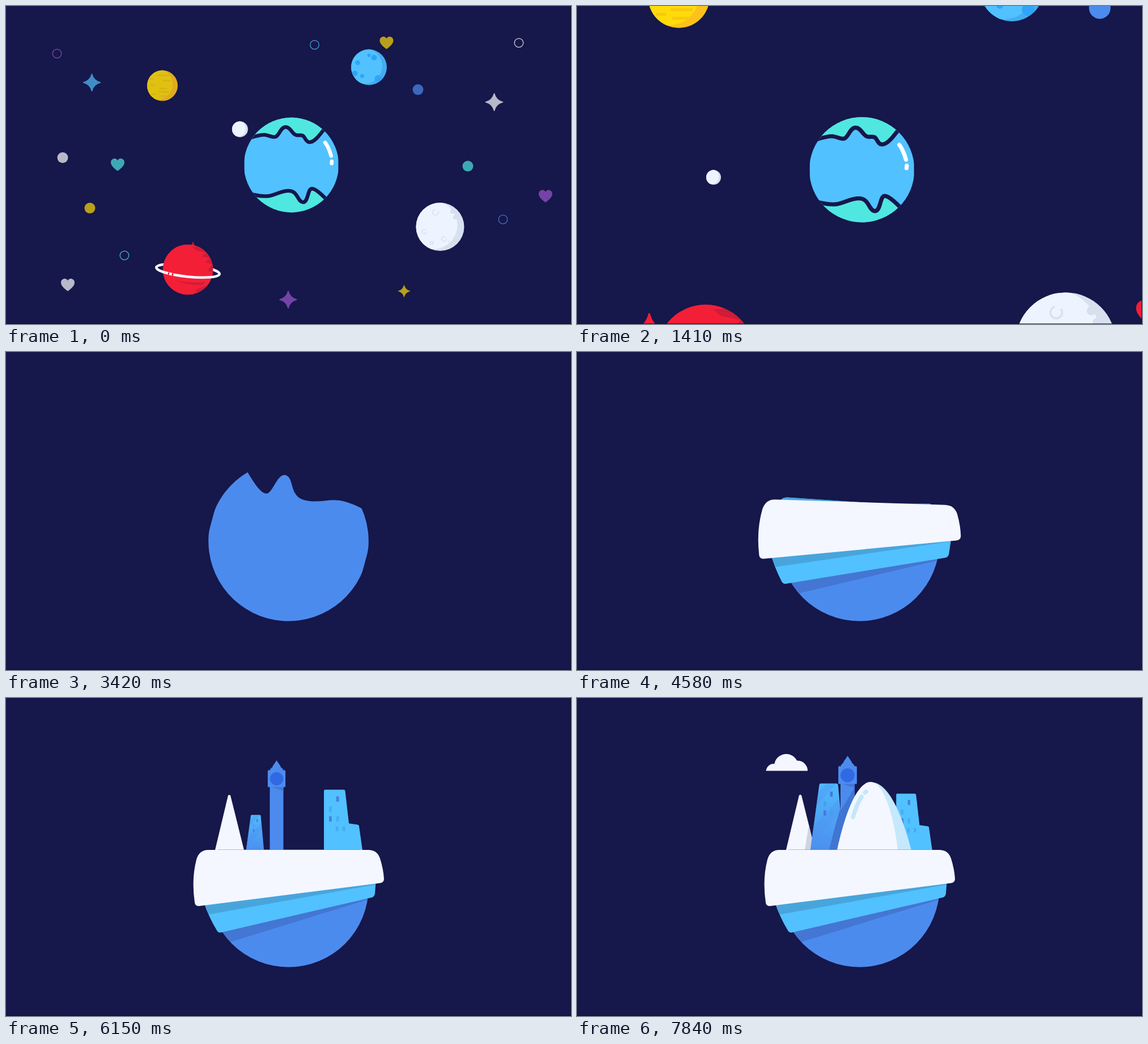
Write an HTML page that moves like this. It is 997x561 px and loops after 7990 ms.

```html
<!DOCTYPE html>
<html lang="en">
<head>
<meta charset="utf-8">
<title>Planet city</title>
<style>
html, body { margin: 0; height: 100%; overflow: hidden; background: #16174a; }
svg { display: block; width: 100vw; height: 100vh; }
</style>
</head>
<body>
<svg viewBox="0 0 997 561">
  <defs>
    <clipPath id="disc"><circle r="141.3"/></clipPath>
    <clipPath id="baseClip"><circle cx="498.5" cy="333.5" r="141"/></clipPath>
    <path id="bandShape" d="M373 268H630Q648 268 651 290L652.5 325 651 345Q650 351 645 352L380 413.5Q375 415 372 410Q358 387 349 360L357 284Q360 268 373 268Z"/>
    <clipPath id="bandClip"><use href="#bandShape"/></clipPath>
    <path id="towerTwo" d="M412 268L427.5 155Q428 152 430 152H457Q460 152 460.5 155L471 268Z"/>
    <clipPath id="twoClip"><use href="#towerTwo"/></clipPath>
    <linearGradient id="glass" x2="0" y2="1">
      <stop stop-color="#50bafd"/><stop offset="1" stop-color="#4c8fee"/>
    </linearGradient>
  </defs>

  <g id="space"><g id="decor"></g><g id="planets"></g></g>

  <g id="city">
    <g id="block">
      <path fill="#52c1ff" d="M563 268V170Q563 168 565 168H596Q598 168 598.3 170L604.5 224 619 226Q621 226.500 621.300 228L627 268Z"/>
      <path fill="#4a80e0" d="M583.500 179h4.500v9h-4.500zM571.500 212h4.500v9h-4.500z"/>
      <path fill="#46aef2" d="M571.500 196h4.500v9h-4.500zM583.500 212h4.500v9h-4.500zM582.500 229h4.500v8h-4.500zM594 229h4.500v8h-4.500z"/>
    </g>
    <g id="clock" fill="#4c8bee">
      <path d="M465 150H490V268H465Z"/>
      <path fill="#4476d3" d="M467 152H490V159Z"/>
      <path id="clockShade" fill="#4075d2" d="M490 158L465 200V268H490Z"/>
      <path d="M477.500 103L485 114V116H487V118H489V121H492Q493.800 121 493.800 123V151Q493.800 152.500 492 152.500H463Q461.200 152.500 461.200 151V123Q461.200 121 463 121H466V118H468V116H470V114Z"/>
      <circle cx="477.500" cy="137" r="12.300" fill="#3169e4"/>
    </g>
    <g id="cone">
      <path fill="#f4f7ff" d="M369 268L391.800 172.500Q394 169 396.200 172.500L420 268Z"/>
      <path id="coneShade" fill="#d0d4de" d="M409 225L402 268H420Z"/>
    </g>
    <g id="two">
      <use href="#towerTwo" fill="url(#glass)"/>
      <g clip-path="url(#twoClip)">
        <path fill="#4c8bee" opacity=".3" d="M440 152L415 180V200L458 152ZM475 165L410 235V262L475 190Z"/>
        <path id="twoShade" fill="#4075d2" d="M466 190Q455 225 445 268H475V190Z"/>
      </g>
      <path fill="#4378dd" d="M446.500 166h4.500v9h-4.500zM435 199h4.500v9h-4.500z"/>
      <path fill="#489eec" d="M435 183h4.500v9h-4.500zM447 199h4.500v9h-4.500z"/>
    </g>
    <g id="dome">
      <path fill="#c6e8fc" d="M459 268C470 215 492 148 518 148C552 148 575 212 590 268Z"/>
      <path fill="#f4f7ff" d="M459 268C470 215 492 148 518 148C543 148 560 215 566 268Z"/>
      <path id="gleam" fill="none" stroke="#c3e7fb" stroke-width="7.500" stroke-linecap="round" d="M508 166.500L510 165M502 174Q493 188 487 210"/>
    </g>
    <path id="cloud" fill="#f4f7ff" d="M333.500 128.500A14 14 0 0 1 348.500 116A21 21 0 0 1 388 110.500A18 18 0 0 1 407 128.500Z"/>
  </g>

  <g id="globe"><g clip-path="url(#disc)">
    <path id="lowCap" fill="#50e7e1"/>
    <path id="body"/>
    <path id="topCap" fill="#50e7e1"/>
    <path id="lowLine" fill="none" stroke="#16174a"/>
    <path id="topLine" fill="none" stroke="#16174a"/>
    <path id="shine" fill="none" stroke="#fff" stroke-width="11" stroke-linecap="round" d="M100.500 -67Q112 -52 118.500 -27M120.500 -11L120 -4.500"/>
  </g></g>

  <g id="layers">
    <g clip-path="url(#baseClip)"><path id="baseShade" fill="#4476d3" d="M360 441.400L660 349V300H350Z"/></g>
    <g id="band">
      <use href="#bandShape" fill="#52c1ff"/>
      <g clip-path="url(#bandClip)"><path id="bandShade" fill="#48a5dc" d="M330 387L670 326V250H330Z"/></g>
    </g>
    <path id="slab" fill="#f4f7ff" d="M357 268H639Q655 268 660 283Q666 302 667 319Q667 325.500 660 326.500L341 367Q334 367.500 333 361Q327 320 336 285Q341 268 357 268Z"/>
  </g>
  <path fill="#080920" opacity=".8" d="M0 560H997V561H0ZM996 0H997V561H996Z"/>
</svg>
<script>
const el = id => document.getElementById(id);
const set = (id, name, value) => el(id).setAttribute(name, value);
const clamp = x => Math.max(0, Math.min(1, x));
const span = (t, a, b) => clamp((t - a) / (b - a));
const inOut = (x, n) => x < .5 ? (2 * x) ** n / 2 : 1 - (2 - 2 * x) ** n / 2;
const ease = (t, a, b) => inOut(span(t, a, b), 2);
const lerp = (a, b, k) => a + (b - a) * k;
const LOOP = 7990;

// Decorations
const C = { w: '#fff', y: '#ffdb0a', b: '#4c8bee', c: '#52c1ff', t: '#50e7e1', p: '#a057d0', r: '#f31f37' };
const heart = 'M0 11C-7 6-12 1-12-4C-12-9-8-11-5.500-11C-3-11-1-9.500 0-7.500C1-9.500 3-11 5.500-11C8-11 12-9 12-4C12 1 7 6 0 11Z';
const star = 'M0-15Q3-3 15 0Q3 3 0 15Q-3 3-15 0Q-3-3 0-15Z';
const shapes = {
  ring: c => `<circle r="7.800" fill="none" stroke="${c}" stroke-width="1.500"/>`,
  dot: c => `<circle r="9.500" fill="${c}"/>`,
  heart: c => `<path fill="${c}" d="${heart}"/>`,
  star: c => `<path fill="${c}" stroke="${c}" stroke-width="1.600" stroke-linejoin="round" d="${star}"/>`,
  spark: c => `<g transform="scale(.67)">${shapes.star(c)}</g>`
};
el('decor').innerHTML = `ring p 90 84,ring c 544.5 68.5,ring w 905 65,ring b 877 376.5,ring t 209 440,
dot w 100 267.5,dot y 148 356.5,dot b 727 147.5,dot t 815 282.5,
heart y 671.5 65,heart t 197 280,heart p 952 335.5,heart w 109 492,heart r 771 416,
star c 151.5 135,star w 861.5 169.5,star p 498 518,spark y 702.5 503,star r 330 432`
  .split(',').map(s => {
    const [kind, c, x, y] = s.trim().split(' ');
    return `<g transform="translate(${x} ${y})">${shapes[kind](C[c])}</g>`;
  }).join('');

// Planets: start and later position, radius and growth
const crater = (x, y, r) => `<circle cx="${x}" cy="${y}" r="${r}"/>`;
const planets = [
  { id: 'gold', p: [276, 140.5], q: [180, -15], r: 27, s: 2, light: '#ffdb0a', dark: '#fcc21b', off: 9,
    art: '<path stroke="#f9c80f" stroke-width="2.600" d="M-7 11H12M-20 15H-11M-6 18.500H9M-21-1H-13M-5 5H8M-10-18H12M-24-12H-16M0-9H14"/>' },
  { id: 'blue', p: [640.5, 108], q: [767, -28.5], r: 31.5, s: 1.77, light: '#52c1ff', dark: '#45abef', off: 8,
    art: `<g fill="#2fa4f8">${crater(9, -17, 5)}${crater(0, -21, 3)}${crater(-20, -8, 4)}${crater(-25, 11, 5)}${crater(-12, 15.5, 3.5)}${crater(16, 20, 6)}</g>` },
  { id: 'pale', p: [766, 389.5], q: [862, 593], r: 42.5, s: 2.07, light: '#edf4ff', dark: '#d7e0ef', off: 12,
    art: `<g fill="#d7e0ef">${crater(22, -27, 4)}${crater(27, -17, 4)}${crater(15, 26, 1.2)}</g>
      <g fill="none" stroke="#d7e0ef" stroke-width="1.600" stroke-dasharray="22 6">${crater(-8, -25.5, 5)}${crater(-28, 8.5, 4)}${crater(7, 21.5, 4.2)}${crater(-15, 28.5, 2.5)}</g>` },
  { id: 'red', p: [321, 465], q: [227, 612.5], r: 44.3, s: 1.94, light: '#f31f37', dark: '#f31f37', off: 0,
    back: '<path transform="translate(0 2) rotate(6)" fill="none" stroke="#f6f8ff" stroke-width="4.500" d="M-56 0A56 10.500 0 0 1 56 0"/>',
    art: '<path fill="#cf1c38" d="M7-40L42-42 50 5 34 2 43-9 30-13 39-20 24-23 32-30 14-34ZM-26 18Q0 25 30 22L26 27Q-2 28-26 18ZM12 36L34 28 26 44 8 43 16 39Z"/>',
    front: '<g transform="translate(0 2) rotate(6)" fill="none" stroke-width="4.500"><path stroke="#f6f8ff" stroke-linecap="round" d="M-56 0A56 10.500 0 0 0 56 0"/><path stroke="#f31f37" d="M-34.500 8.500L-32.300 8.800M-27.500 9.200L-25 9.500"/></g>' },
  { id: 'moon', r: 14, light: '#eef4ff', dark: '#d5deee', off: 4, art: '' }
];
el('planets').innerHTML = planets.map(({ id, r, light, dark, off, art, back = '', front = '' }) => `
  <clipPath id="${id}Clip"><circle r="${r}"/></clipPath>
  <g id="${id}">${back}<circle r="${r}" fill="${dark}"/>
  <g clip-path="url(#${id}Clip)"><circle cx="${-off}" cy="${-off / 4}" r="${r}" fill="${light}"/>${art}</g>${front}</g>`).join('');

// Globe coastlines; the lower one melts into a flat edge
const coast = 'M-140-76C-112-84-95-91-79-90C-64-88-56-81-47-84C-36-88-32-113-17-113C-2-113 3-91 15-89C22-87 28-91 35-87C41-83 43-68 54-68C70-68 85-90 112-125';
const low = [[-140, 80], [-118, 88], [-90, 95], [-68, 92.5], [-48, 90], [-32, 77], [-8, 77], [20, 77], [18, 110],
  [35, 111], [51, 111], [48, 71], [61, 70.5], [76, 70], [104, 102], [140, 138]];
set('topLine', 'd', coast);
set('topCap', 'd', coast + 'V-170H-140Z');

function about(id, x, y, s, rot = 0) {
  set(id, 'transform', `translate(${x} ${y}) rotate(${rot}) scale(${Math.max(s, .0001)}) translate(${-x} ${-y})`);
}

function drawSpace(t) {
  const u = Math.max(0, (t - 430) / 980) ** 2.5;
  el('space').style.display = t < 2600 ? '' : 'none';
  about('decor', 532, 291, 1 + u);
  const fade = span(t, 0, 1400);
  set('decor', 'opacity', lerp(.7, 1, fade));
  set('gold', 'opacity', lerp(.87, 1, fade));
  for (const { id, p, q, s } of planets) {
    if (!p) continue;
    set(id, 'transform', `translate(${lerp(p[0], q[0], u)} ${lerp(p[1], q[1], u)}) scale(${lerp(1, s, u)})`);
  }
  const a = (215 - 38 * u) * Math.PI / 180, d = 110 + 152 * u;
  set('moon', 'transform', `translate(${503 + d * Math.cos(a)} ${280.5 + 7.5 * u - d * -Math.sin(a)}) scale(${Math.max(.5, 1 - .07 * u)})`);
}

function drawGlobe(t) {
  const k = inOut(span(t, 900, 2400), 3), flat = ease(t, 3450, 3830), turn = ease(t, 2720, 3400);
  const change = ease(t, 2780, 3330);
  set('globe', 'transform', `translate(${lerp(503.5, 498.5, k)} ${lerp(280.5, 333.5, k)}) rotate(${195 * turn - 15 * flat}) scale(${lerp(83.5, 141, k) / 141})`);
  const pts = low.map(([x, y]) => [x, lerp(y, 66, flat)]);
  const line = `M${pts[0]}C${pts.slice(1).join(' ')}`;
  set('lowLine', 'd', line);
  set('lowCap', 'd', line + 'V170H-140Z');
  set('body', 'd', line + 'V-170H-140Z');
  set('body', 'fill', `rgb(${[[82, 76], [193, 139], [255, 238]].map(([a, b]) => Math.round(lerp(a, b, change)))})`);
  for (const id of ['lowCap', 'topCap', 'shine']) set(id, 'opacity', 1 - change);
  for (const id of ['lowLine', 'topLine']) {
    set(id, 'stroke-width', 11 * (1 - change));
    el(id).style.display = change < 1 ? '' : 'none';
  }
}

function drawLayers(t) {
  const swing = 1 - ease(t, 4580, 5400);
  const grow = start => 1 - (1 - span(t, start, 4580)) ** 2;
  const b = grow(3900), w = grow(4130);
  el('layers').style.display = t > 3900 ? '' : 'none';
  const bandTurn = 3.8 * swing + 15 * (1 - b);
  about('band', 500, 330, b * (1 + .045 * swing), bandTurn);
  about('baseShade', 500, 330, b * (1 + .045 * swing), bandTurn);
  about('bandShade', 500, 356, 1, -1.9 * swing);
  about('slab', 498.5, 317, w * (1 + .062 * swing), 1.8 * swing + 12 * (1 - w));
}

// Quick rise followed by a damped wobble
function pop(t, start) {
  const x = (t - start) / 300, r = (t - start - 300) / 1000;
  if (x <= 0) return 0;
  return x < 1 ? 1 - (1 - x) ** 2 : 1 + .075 * Math.exp(-1.1 * r) * Math.sin(2 * Math.PI * r / .7);
}

function drawCity(t) {
  el('city').style.display = t > 5100 ? '' : 'none';
  about('cone', 394, 268, pop(t, 5150));
  about('clock', 477.5, 268, pop(t, 5325));
  about('block', 595, 268, pop(t, 5675));
  about('two', 437, 268, pop(t, 6056));
  about('dome', 520, 268, pop(t, 6480));
  set('coneShade', 'opacity', span(t, 6200, 6400));
  for (const id of ['clockShade', 'twoShade']) set(id, 'opacity', span(t, 6550, 6800));
  set('gleam', 'opacity', span(t, 7180, 7500));
  about('cloud', 370, 128.5, 1 - (1 - span(t, 7180, 7650)) ** 3);
}

function frame(now) {
  const t = now % LOOP;
  drawSpace(t);
  drawGlobe(t);
  drawLayers(t);
  drawCity(t);
  requestAnimationFrame(frame);
}
const begin = performance.now();
const tick = now => frame(Math.max(0, now));
drawSpace(0); drawGlobe(0); drawLayers(0); drawCity(0);
requestAnimationFrame(function loop() {
  const t = (performance.now() - begin) % LOOP;
  drawSpace(t); drawGlobe(t); drawLayers(t); drawCity(t);
  requestAnimationFrame(loop);
});
</script>
</body>
</html>
```
